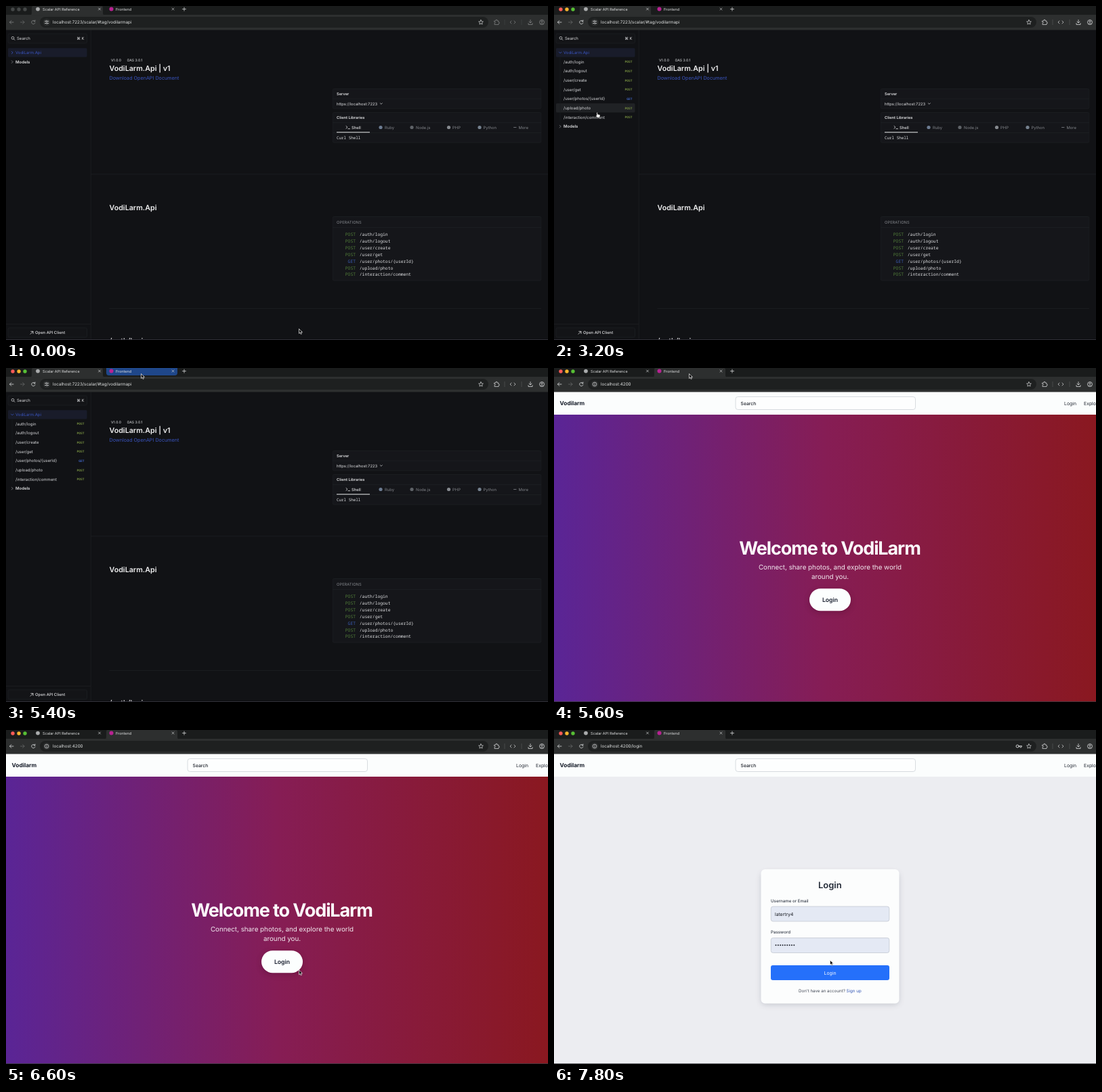
These frames come from a looping animation (800 by 494 pixels, 8000 ms). An HTML page:

```html
<!DOCTYPE html>
<html lang="en">
<head>
<meta charset="utf-8">
<title>API reference and login</title>
<style>
html, body { margin: 0; width: 100%; height: 100%; overflow: hidden; background: #111215; }
svg { display: block; width: 100vw; height: 100vh; font-family: Inter, "Open Sans", sans-serif; }
.mono { font-family: "Noto Sans Mono", "DejaVu Sans Mono", monospace; }
text { white-space: pre; text-rendering: geometricPrecision; }
</style>
</head>
<body>
<svg id="stage" viewBox="0 0 800 494"></svg>
<script>
const LOOP = 8000, STEP = 200;
const ACTIVATE = 400, EXPAND = 2000, HOME = 5600, LOGIN = 7600;
const ROW = 13.65, ROW_TOP = 69;
const PAGE = '#111215', BAR = '#2d2f2f';
const BLUE = '#3a55c0', GREEN = '#54813a', LIGHT = '#e0e1e3', GREY = '#83868b', LINE = '#1f2125';

// y is the optical centre of the line
const text = (x, y, s, size, fill = LIGHT, more = '') =>
  `<text x="${x}" y="${(y + size * 0.36).toFixed(2)}" font-size="${size}" fill="${fill}" ${more}>${s}</text>`;
const rect = (x, y, w, h, fill, r = 0, more = '') =>
  `<rect x="${x}" y="${y}" width="${w}" height="${h}" rx="${r}" fill="${fill}" ${more}/>`;
const path = (d, stroke, w = 0.8, more = '') =>
  `<path d="${d}" fill="none" stroke="${stroke}" stroke-width="${w}" stroke-linecap="round" stroke-linejoin="round" ${more}/>`;
const circle = (x, y, r, fill, more = '') => `<circle cx="${x}" cy="${y}" r="${r}" fill="${fill}" ${more}/>`;
const group = (id, s, more = '') => `<g id="${id}" ${more}>${s}</g>`;
const hline = (x1, x2, y, c = LINE) => rect(x1, y, x2 - x1, 0.7, c);
const W = n => `font-weight="${n}"`;
const MID = 'text-anchor="middle"';
const END = 'text-anchor="end"';

const routes = [
  ['POST', '/auth/login'], ['POST', '/auth/logout'], ['POST', '/user/create'], ['POST', '/user/get'],
  ['GET', '/user/photos/{userId}'], ['POST', '/upload/photo'], ['POST', '/interaction/comment']
];

function chrome() {
  const cross = x => path(`M${x - 1.5} 3l3 3m0-3l-3 3`, '#d5d6d7', 0.7);
  const tab = x => `<path d="M${x - 3} 13.5q3 0 3-3V2q0-2 2-2h101q2 0 2 2v8.5q0 3 3 3z" fill="${BAR}"/>`;
  const star = path('M701 20.6l1 2.2 2.4.3-1.8 1.6.5 2.4-2.1-1.2-2.1 1.2.5-2.4-1.8-1.6 2.4-.3z', '#d8dadb', 0.7);
  const right = [
    path('M721 22h2q-.6-1.8 1-1.8t1 1.8h2v2q1.3-.3 1.3 1t-1.3 1v1.5h-6v-2q1.3 0 1.3-1t-1.3-1z', '#c9cbcc'),
    rect(735.7, 20, 0.6, 8, '#5b5e5f'),
    path('M746 22l-2 2 2 2m4-4l2 2-2 2', '#c9cbcc'),
    rect(760.7, 20, 0.6, 8, '#5b5e5f'),
    path('M774 20.5v4.5m-2-2l2 2 2-2m-5 2.5v2h6v-2', '#d8dadb'),
    circle(791, 24, 3.5, 'none', 'stroke="#d8dadb" stroke-width=".8"'),
    circle(791, 23, 1.2, 'none', 'stroke="#d8dadb" stroke-width=".7"'),
    path('M788.8 26.5q2.2-2 4.4 0', '#d8dadb', 0.7)
  ].join('');
  return rect(0, 0, 800, 14, '#1a1c1c') + rect(0, 13, 800, 22.5, BAR) +
    rect(50, 16, 662, 16, '#1e2020', 8) +
    group('idle', [10, 19, 28].map(x => circle(x, 5, 2.7, '#454848')).join('')) +
    group('lights', circle(10, 5, 2.7, '#fb5b57') + circle(19, 5, 2.7, '#f5b52d') + circle(28, 5, 2.7, '#57bf35')) +
    group('tabA', tab(38)) + group('tabB', tab(148)) +
    group('tabHover', rect(148, -3, 105, 14, '#1f478a', 4)) +
    circle(47, 4.6, 2.9, '#a9abac') + text(54, 4.7, 'Scalar API Reference', 5.5, '#dfe0e1') + cross(138) +
    circle(155.5, 4.6, 3, '#b82292') + text(162, 4.7, 'Frontend', 5.5, '#dfe0e1') + cross(246.5) +
    path('M260.5 4.6h5m-2.5-2.5v5', '#d5d6d7') +
    group('nav', path('M11 24h-5.5m2.3-2.4l-2.4 2.4 2.4 2.4', '#dadcdd') +
      path('M42.8 22.7a2.7 2.7 0 1 0 .2 2.2m-.1-4v2h-2', '#dadcdd')) +
    path('M21.5 24h5.5m-2.3-2.4l2.4 2.4-2.4 2.4', '#666969') +
    circle(60, 24, 5.3, BAR) +
    group('tune', path('M57.5 22.5h1.2m2 0h2m-5.2 3h2m2 0h1.2', '#dadcdd') +
      circle(59.7, 22.5, 0.9, 'none', 'stroke="#dadcdd" stroke-width=".7"') +
      circle(60.5, 25.5, 0.9, 'none', 'stroke="#dadcdd" stroke-width=".7"')) +
    group('info', circle(60, 24, 2.9, 'none', 'stroke="#dadcdd" stroke-width=".7"') +
      path('M60 24v1.3M60 22.5v.1', '#dadcdd')) +
    group('key', circle(684, 24, 2, 'none', 'stroke="#d8dadb" stroke-width=".9"') +
      path('M686 23.5h4.5v1.2h-1v1.2h-1.3v-1.2h-2.2', '#d8dadb')) +
    text(69, 24.2, '', 6.3, '#e2e4e4', 'id="url"') + star + group('right', right);
}

function sidebar() {
  const item = ([verb, name], i) => {
    const y = ROW_TOP + ROW * (i + 1);
    return text(14, y, name, 6, '#d8d9dc') +
      text(115.5, y, verb, 4.6, verb === 'GET' ? '#3f62bd' : '#768f40', `class="mono" ${END} ${W(600)}`);
  };
  return rect(0, 35, 125, 459, PAGE) + rect(124.8, 35, 0.7, 459, LINE) +
    rect(3, 41, 116.5, 14, '#131417', 2, `stroke="${LINE}" stroke-width=".7"`) +
    circle(10, 47.3, 1.9, 'none', `stroke="${LIGHT}" stroke-width=".7"`) + path('M11.4 48.7l1.5 1.6', LIGHT, 0.7) +
    text(16, 48, 'Search', 6) + text(115.5, 48, '⌘ K', 5.8, LIGHT, END) +
    rect(3, 62.2, 116.5, 13.3, '#191c2a', 1.5) +
    path('', BLUE, 0.8, 'id="chevron"') + text(14, 69, 'VodiLarm.Api', 6, BLUE) +
    rect(3, 0, 116.5, 13.3, '#202225', 1.5, 'id="rowHover"') +
    group('items', rect(8.7, 76, 0.6, 95, '#1c1e21') + routes.map(item).join('')) +
    group('models', path('M8.3 -1.8l1.8 1.8-1.8 1.8', GREY) + text(14, 0, 'Models', 6, LIGHT, W(600))) +
    hline(0, 125, 470) + rect(3, 476, 116.5, 14, '#131417', 2, `stroke="${LINE}" stroke-width=".7"`) +
    path('M36 485.3l4-4m-3.2 0h3.2v3.2', LIGHT) + text(43, 483.2, 'Open API Client', 5.9, LIGHT, W(500));
}

function docs() {
  const card = (y, h) => rect(482.3, y, 307.5, h, '#15161a', 2, `stroke="${LINE}" stroke-width=".7"`);
  const logos = [[553, 'Ruby', 559, '#6c7c92'], [599, 'Node.js', 605, '#5f6368'],
    [653.5, 'PHP', 659, '#85898e'], [699, 'Python', 704.5, '#75818f']];
  const operation = ([verb, name], i) => {
    const y = 337.8 + 9.9 * i;
    return text(516, y, verb, 6.35, verb === 'GET' ? '#3b5db5' : GREEN, `class="mono" ${END}`) +
      text(521.8, y, name, 6.35, LIGHT, 'class="mono"');
  };
  return rect(0, 35, 800, 459, PAGE) +
    text(155, 80, 'V1.0.0', 5.1, '#c9cbce', W(500)) + text(178.5, 80, 'OAS 3.0.1', 5.1, '#c9cbce', W(500)) +
    text(152.5, 92.5, 'VodiLarm.Api | v1', 10.7, '#f1f1f2', W(600)) +
    text(152.5, 106.8, 'Download OpenAPI Document', 7.2, BLUE) +
    card(122.5, 29.3) + hline(482, 790, 136.8) + text(488, 129.7, 'Server', 5.7, LIGHT, W(600)) +
    text(488, 144.5, 'https://localhost:7223', 5.8) + path('M552.3 143.7l1.5 1.5 1.5-1.5', LIGHT, 0.7) +
    card(157.5, 44.5) + hline(482, 790, 172) + hline(482, 790, 187) +
    text(488, 164.8, 'Client Libraries', 5.7, LIGHT, W(600)) +
    path('M502 177.5l2 1.8-2 1.8m3 .5h2.5', LIGHT) + text(510, 179.6, 'Shell', 5.9, LIGHT, W(500)) +
    logos.map(([x, s, tx, c]) => circle(x, 179.5, 2.6, c) + text(tx, 179.6, s, 5.9, GREY)).join('') +
    path('M749.5 179.5h3.5', GREY) + text(756.5, 179.6, 'More', 5.9, GREY) +
    rect(488, 186.3, 49, 1, '#e9e9ea') + text(488, 195, 'Curl Shell', 5.9, LIGHT, 'class="mono"') +
    hline(125, 800, 248.5) + text(152.5, 298.3, 'VodiLarm.Api', 10.7, '#f1f1f2', W(600)) +
    card(311.5, 94.5) + hline(482, 790, 327) + text(488, 320, 'OPERATIONS', 5.8, GREY) +
    routes.map(operation).join('') + hline(152.5, 790, 447) +
    text(152.5, 495.5, '/auth/login', 10.7, '#f1f1f2', W(600)) +
    sidebar() + rect(0, 492.7, 800, 1.3, '#0b0712');
}

function siteBar() {
  return rect(0, 35, 800, 34, '#fbfdfd') + text(8.5, 52.2, 'Vodilarm', 8.4, '#151b28', W(700)) +
    rect(268, 42.5, 265.5, 19, '#fdfefe', 3.5, 'stroke="#cfd3d8" stroke-width=".8"') +
    text(275.5, 52.2, 'Search', 6.8, '#191d26', W(500)) +
    text(753, 52.2, 'Login', 6.9, '#222833') + text(782, 52.2, 'Explore', 6.9, '#222833');
}

function home() {
  return rect(0, 68.5, 800, 425, 'url(#sunset)') +
    text(407, 266, 'Welcome to VodiLarm', 27, '#fdfbfd', `${MID} ${W(700)} letter-spacing="-1.1"`) +
    text(407.5, 294, 'Connect, share photos, and explore the world', 9.8, '#f3eaf0', MID) +
    text(407.5, 308.8, 'around you.', 9.8, '#f3eaf0', MID) +
    group('button', rect(-30.5, -12, 61, 33, '#2a0518', 16, 'id="shade" filter="url(#soft)"') +
      rect(-30.5, -16.5, 61, 33, '#fcfefe', 16.5) +
      text(0, 0.2, 'Login', 8.7, '#1a2030', `${MID} ${W(600)}`));
}

function login() {
  const field = y => rect(320.3, y, 174.5, 22, '#e4e9f4', 3, 'stroke="#c3c8d2" stroke-width=".8"');
  const dots = Array.from({ length: 9 }, (_, i) => circle(327.5 + i * 3.35, 318.3, 1, '#20242d')).join('');
  return rect(0, 68.5, 800, 426, '#ecedf1') +
    rect(306, 211, 203, 195, '#5d6270', 6, 'opacity=".28" filter="url(#soft)"') +
    rect(305.5, 206, 204, 198.5, '#fcfdfd', 6) +
    text(407.3, 229.3, 'Login', 13, '#222936', `${MID} ${W(600)}`) +
    text(320, 252.7, 'Username or Email', 6.2, '#353c49', W(500)) + field(261) +
    text(326, 272.2, 'latertry4', 6.8, '#15181f') +
    text(320, 299, 'Password', 6.2, '#353c49', W(500)) + field(307.5) + dots +
    rect(320, 348, 175, 22, '#2570fa', 3) + text(407.5, 359.2, 'Login', 6.9, '#f7faff', MID) +
    text(361, 385.5, `Don't have an account? <tspan fill="#2f54b4">Sign up</tspan>`, 6.2, '#424956');
}

const svg = document.getElementById('stage');
svg.innerHTML = `<defs>
  <linearGradient id="sunset"><stop stop-color="#5a2596"/><stop offset=".5" stop-color="#861d55"/><stop offset="1" stop-color="#8a1820"/></linearGradient>
  <filter id="soft" x="-40%" y="-40%" width="180%" height="200%"><feGaussianBlur stdDeviation="4"/></filter></defs>` +
  group('docs', docs()) + group('home', home()) + group('login', login()) + group('siteBar', siteBar()) +
  rect(0, 493.2, 800, 0.8, '#3a3b40') + chrome() +
  group('arrow', '<path d="M0 0v6.9l1.6-1.5 1.1 2.5 1.2-.5-1.1-2.5h2.2z" fill="#0b0b0c" stroke="#f4f4f4" stroke-width=".7"/>') +
  group('hand', '<path d="M-.6.7q.8-1 1.5 0v2.3l3 .7q.9.4.7 1.5l-.6 3h-3.7l-2-2.7q0-1 1.1-.5z" fill="#fafafa" stroke="#141414" stroke-width=".6"/>');

const el = id => document.getElementById(id);
const show = (id, on) => el(id).setAttribute('display', on ? 'inline' : 'none');
const move = (id, x, y, more = '') => el(id).setAttribute('transform', `translate(${x} ${y}) ${more}`);
const clamp = v => Math.max(0, Math.min(1, v));
const ease = v => v * v * (3 - 2 * v);

// time, x, y of the pointer tip
const track = [
  [0, 432.5, 477.5], [600, 432.5, 477.5], [1600, 45, 71], [2200, 45, 71], [3200, 63.5, 157],
  [3800, 66, 163], [4600, 72, 98], [5000, 90, 80], [5400, 199.5, 8.5], [6000, 199.5, 8.5],
  [6600, 432.5, 355], [6800, 430, 354], [7200, 407.5, 340.5], [8000, 407.5, 340.5]
];

function pointer(t) {
  const i = track.findIndex((p, n) => n > 0 && t <= p[0]);
  const [t0, x0, y0] = track[i - 1], [t1, x1, y1] = track[i];
  const k = ease((t - t0) / (t1 - t0));
  return [x0 + (x1 - x0) * k, y0 + (y1 - y0) * k];
}

function update(t) {
  const [x, y] = pointer(t);
  const onDocs = t < HOME, onLogin = t >= LOGIN, onHome = !onDocs && !onLogin;
  const active = t >= ACTIVATE, open = t >= EXPAND;
  show('docs', onDocs);
  show('home', onHome);
  show('login', onLogin);
  show('siteBar', !onDocs);

  show('idle', !active);
  show('lights', active);
  for (const id of ['nav', 'right']) el(id).setAttribute('opacity', active ? 1 : 0.5);
  show('tabA', onDocs);
  show('tabB', !onDocs);
  show('tabHover', onDocs && y < 13 && x > 148 && x < 253);
  show('tune', onDocs);
  show('info', !onDocs);
  show('key', onLogin);
  el('url').textContent = onDocs ? 'localhost:7223/scalar/#tag/vodilarmapi' : 'localhost:4200' + (onLogin ? '/login' : '');

  const row = Math.round((y - ROW_TOP) / ROW);
  const last = open ? routes.length + 1 : 1;
  const onRow = onDocs && x > 3 && x < 119 && row >= 0 && row <= last;
  show('items', open);
  show('rowHover', onRow && row > 0);
  el('rowHover').setAttribute('y', ROW_TOP + ROW * row - 6.8);
  el('chevron').setAttribute('d', open ? 'M7.5 68.1l1.8 1.8 1.8-1.8' : 'M8.3 67.2l1.8 1.8-1.8 1.8');
  move('models', 0, ROW_TOP + ROW * last);

  const hover = ease(clamp((t - 6900) / 300));
  move('button', 407.5, 342.7, `scale(${1 + 0.1 * hover})`);
  el('shade').setAttribute('opacity', 0.25 + 0.2 * hover);
  el('shade').setAttribute('y', -14 + 7 * hover);

  const hand = onRow || (onHome && hover > 0);
  show('hand', hand);
  show('arrow', !hand);
  move(hand ? 'hand' : 'arrow', x, y);
}

const start = performance.now();
function frame() {
  const t = (performance.now() - start) % LOOP;
  update(Math.floor(t / STEP) * STEP);
  requestAnimationFrame(frame);
}
frame();
</script>
</body>
</html>
```
